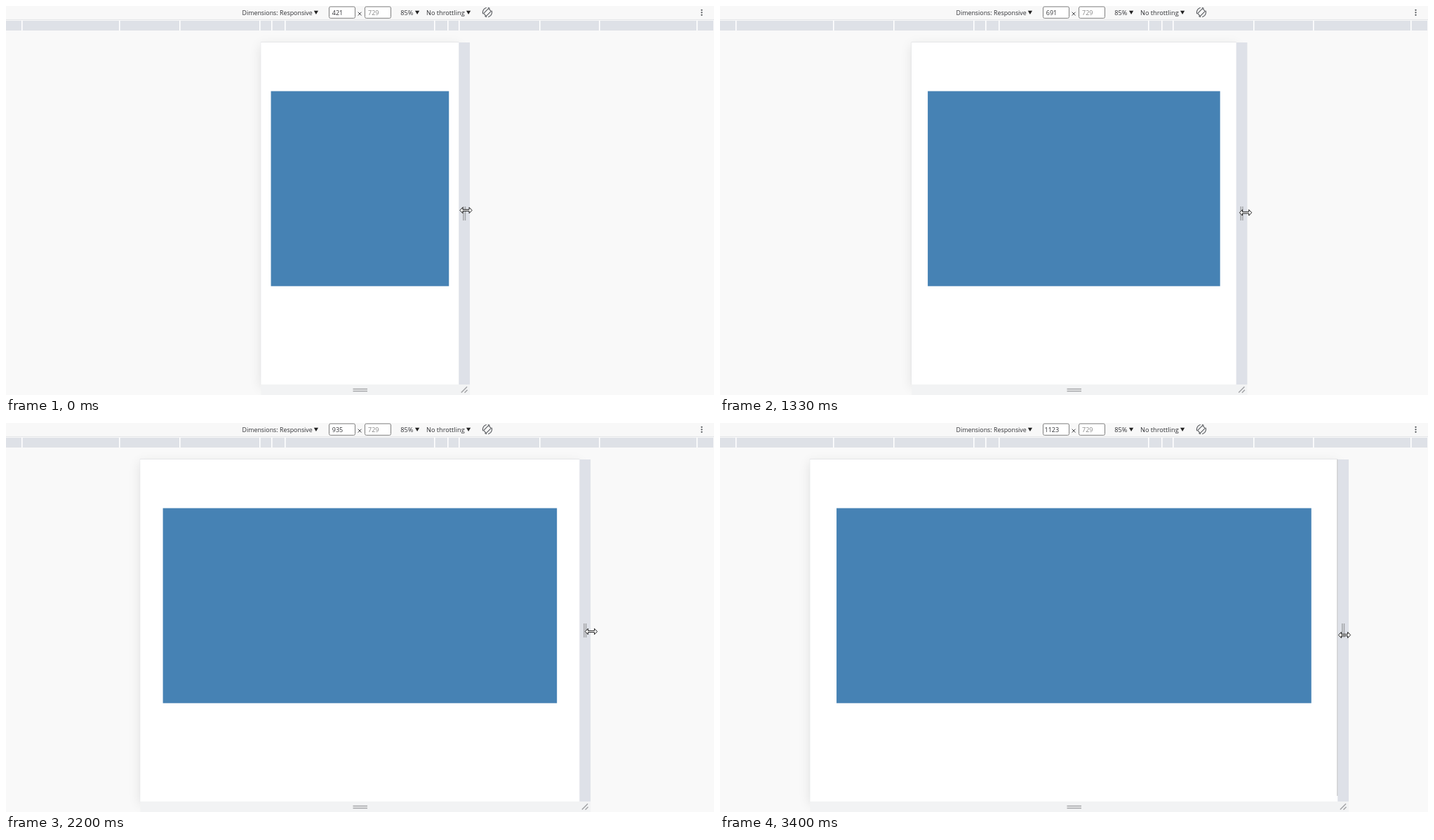
Animation, 1009 px wide and 555 px high, one loop 4.27 s. Source, as an HTML page with a canvas:

```html
<!DOCTYPE html>
<html lang="en">
<head>
<meta charset="utf-8">
<title>Responsive resize</title>
<style>
  html, body { margin: 0; width: 100%; height: 100%; overflow: hidden; background: #f9f9f9; }
  canvas { display: block; }
</style>
</head>
<body>
<canvas id="stage" width="1009" height="555"></canvas>
<script>
const ctx = document.getElementById('stage').getContext('2d');
const LOOP = 4270, FPS = 15, SCALE = 0.6695, MID = 504.4;
const TOP = 52, BOTTOM = 540, STRIP = 15.7;
const FONT = '"Open Sans", "Noto Sans", sans-serif';
const INK = '#303135', HOVER = '#dee1e8', IDLE = '#f2f3f4', GRIP = '#a0a1a4';

// Key poses, in ticks of 1/15 s
const KEYS = [1, 9, 15, 24, 33, 39, 41, 47];
const viewport = track([421, 519, 605, 765, 935, 1053, 1074, 1123]);
const content = track([421, 514, 605, 764, 932, 1053, 1074, 1123]);
const mouseX = track([655.5, 692, 721, 773.5, 834, 870, 877.5, 890]);
const mouseY = track([291.5, 296, 295.5, 294.5, 297.5, 299.5, 300.3, 302.5]);

// Monotone cubic through the key poses
function track(v) {
  const last = KEYS.length - 1;
  const d = v.slice(1).map((y, i) => (y - v[i]) / (KEYS[i + 1] - KEYS[i]));
  const m = v.map((_, i) => {
    if (i === 0) return d[0] * 0.6;
    if (i === last) return d[last - 1] * 0.4;
    const a = d[i - 1], b = d[i];
    return a * b > 0 ? 2 * a * b / (a + b) : 0;
  });
  return k => {
    if (k <= KEYS[0]) return v[0];
    if (k >= KEYS[last]) return v[last];
    let i = 0;
    while (k >= KEYS[i + 1]) i++;
    const h = KEYS[i + 1] - KEYS[i], u = (k - KEYS[i]) / h, w = 1 - u;
    return w * w * ((1 + 2 * u) * v[i] + u * h * m[i]) +
           u * u * ((3 - 2 * u) * v[i + 1] - w * h * m[i + 1]);
  };
}

function rect(x, y, w, h, color) {
  ctx.fillStyle = color;
  ctx.fillRect(x, y, w, h);
}

function line(x1, y1, x2, y2, color, width) {
  ctx.strokeStyle = color;
  ctx.lineWidth = width;
  ctx.beginPath();
  ctx.moveTo(x1, y1);
  ctx.lineTo(x2, y2);
  ctx.stroke();
}

function poly(points) {
  ctx.beginPath();
  points.forEach(([x, y]) => ctx.lineTo(x, y));
  ctx.closePath();
}

function label(s, x, y, size, color = INK) {
  ctx.font = `${size}px ${FONT}`;
  ctx.fillStyle = color;
  ctx.fillText(s, x, y);
}

function arrowDown(x) {
  ctx.fillStyle = '#222';
  poly([[x, 6.7], [x + 6.2, 6.7], [x + 3.1, 12]]);
  ctx.fill();
}

function field(x) {
  ctx.beginPath();
  ctx.roundRect(x + 0.5, 1, 37, 16.4, 2);
  ctx.fillStyle = '#fff';
  ctx.fill();
  ctx.strokeStyle = '#808080';
  ctx.lineWidth = 1;
  ctx.stroke();
}

function rotateIcon(x, y) {
  ctx.save();
  ctx.translate(x, y);
  ctx.strokeStyle = '#55585c';
  ctx.lineWidth = 1.1;
  for (const a of [-0.35, Math.PI - 0.35]) {
    ctx.beginPath();
    ctx.arc(0, 0, 6.6, a, a + 1.75);
    ctx.stroke();
    ctx.beginPath();
    ctx.arc(0, 0, 6.6, a - 1.1, a - 0.65);
    ctx.stroke();
  }
  ctx.rotate(-Math.PI / 4);
  ctx.beginPath();
  ctx.roundRect(-5, -2.7, 10, 5.4, 0.8);
  ctx.stroke();
  ctx.restore();
}

function toolbar(width) {
  rect(0, 0, 1009, 20, '#f8f8f8');
  rect(0, 19, 1009, 1, '#e4e5e8');
  label('Dimensions: Responsive', 336.5, 12.7, 8.87);
  arrowDown(438.8);
  field(460);
  field(511);
  label(width, width > 999 ? 462.5 : 464.8, 12.7, 9);
  label('729', 516, 12.7, 9, '#858585');
  line(501.7, 8.7, 506.5, 13.5, INK, 0.9);
  line(506.5, 8.7, 501.7, 13.5, INK, 0.9);
  label('85%', 562.3, 12.7, 9.2);
  arrowDown(583);
  label('No throttling', 599, 12.7, 9.2);
  arrowDown(656);
  rotateIcon(686, 9);
  for (const y of [5.8, 9.3, 12.8]) {
    ctx.fillStyle = '#505357';
    ctx.beginPath();
    ctx.arc(991.5, y, 1.15, 0, 7);
    ctx.fill();
  }
}

function ruler() {
  rect(0, 21, 1008, 14, '#dee1e7');
  for (const size of [320, 375, 425, 768, 1024, 1440]) {
    const half = size * 0.668 / 2;
    for (const x of [MID - half, MID + half]) rect(Math.round(x) - 1, 21, 1.6, 14, '#fff');
  }
}

function page(left, right, k) {
  ctx.save();
  ctx.shadowColor = 'rgba(0,0,0,.10)';
  ctx.shadowBlur = 16;
  ctx.shadowOffsetY = 4;
  rect(left, TOP, right - left, BOTTOM - TOP, '#fff');
  ctx.restore();
  rect(left - 0.6, TOP - 0.8, right - left + 0.6, 0.8, '#e3e4e6');
  rect(left - 0.6, TOP, 0.6, BOTTOM - TOP, '#e0e1e3');
  rect(left, TOP, right - left, BOTTOM - TOP, '#fff');
  const w = content(k) * SCALE * 0.9;
  rect(MID - w / 2, 121.5, w, 278.2, '#4682b4');
}

function handles(left, right, hover) {
  rect(right, TOP, STRIP, BOTTOM - TOP, hover ? HOVER : IDLE);
  rect(left, BOTTOM, right - left + STRIP, 555 - BOTTOM, IDLE);
  for (const dx of [6.5, 9.2]) line(right + dx, 286, right + dx, 306, GRIP, 1.4);
  for (const y of [546.5, 549.5]) line(494.5, y, 515, y, GRIP, 1.4);
  line(right + 3.5, 551.5, right + 11.7, 543.3, GRIP, 1.4);
  line(right + 8.2, 551.7, right + 12.2, 547.7, GRIP, 1.4);
}

function cursor(x, y) {
  const half = [[-8.6, 0], [-4.6, -4.2], [-4.6, -1.1], [4.6, -1.1], [4.6, -4.2], [8.6, 0]];
  const lower = half.slice(1, -1).reverse().map(([px, py]) => [px, -py]);
  ctx.save();
  ctx.translate(x, y);
  ctx.lineJoin = 'round';
  ctx.lineWidth = 1;
  ctx.fillStyle = '#fff';
  ctx.strokeStyle = '#1c1c1c';
  poly(half.concat(lower));
  ctx.fill();
  ctx.stroke();
  ctx.restore();
}

function draw(t) {
  const k = Math.floor((t + 3.5) * FPS / 1000);
  const width = Math.round(viewport(k));
  const left = MID - width * SCALE / 2, right = MID + width * SCALE / 2;
  rect(0, 0, 1009, 555, '#f9f9f9');
  page(left, right, k);
  handles(left, right, k < 36 || k >= 51);
  if (k >= 47) rect(right - 1, TOP, 1, 480, '#bcbdbf');
  toolbar(width);
  ruler();
  cursor(mouseX(k), mouseY(k));
}

const start = performance.now();
function tick() {
  draw((performance.now() - start) % LOOP);
  requestAnimationFrame(tick);
}
tick();
</script>
</body>
</html>
```
